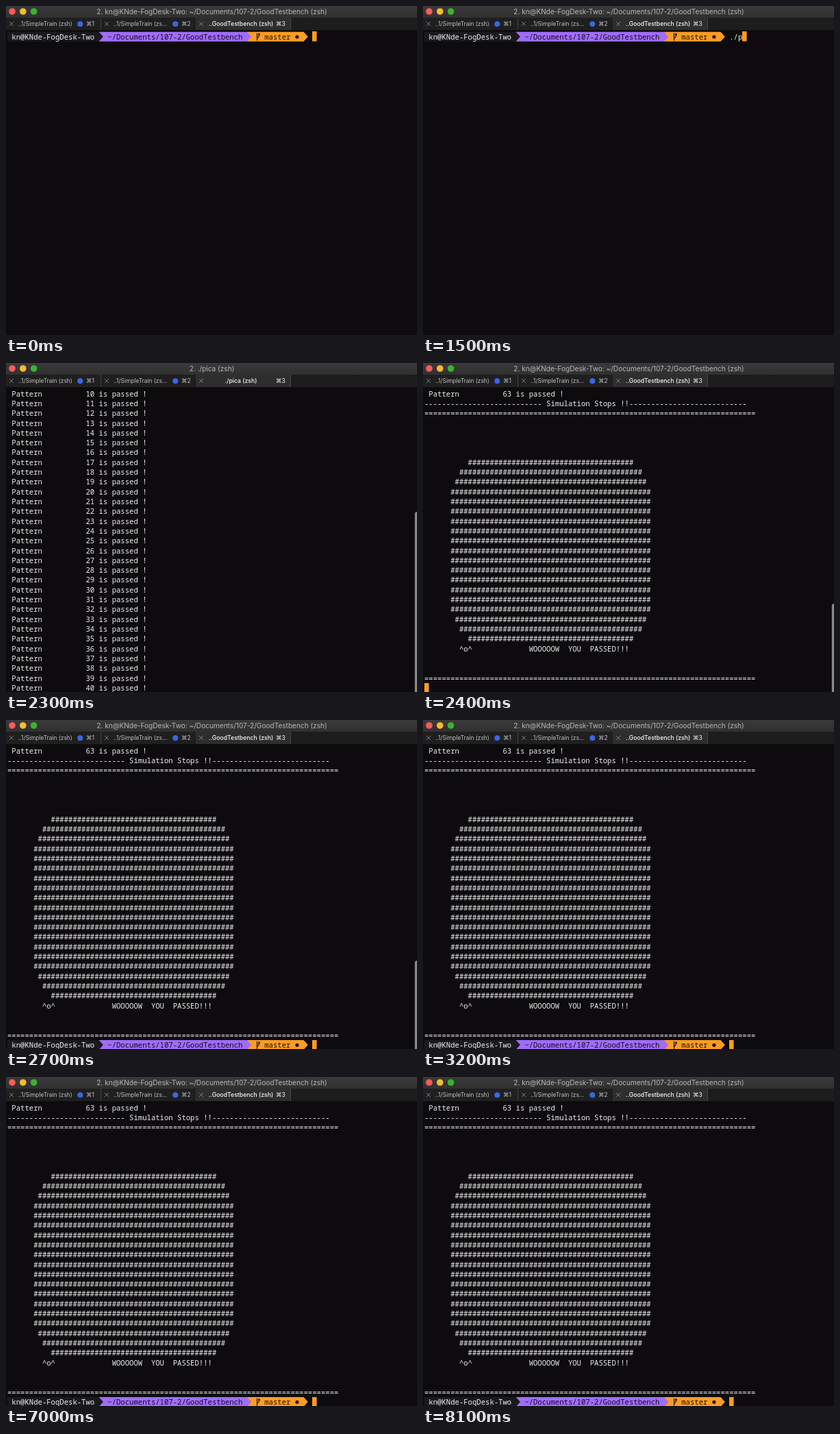
These frames come from a looping animation (600 px wide and 480 px high, 8.3 s). An HTML page with a canvas:

```html
<!DOCTYPE html>
<html lang="en">
<head>
<meta charset="utf-8">
<title>Terminal</title>
<style>
html, body { margin: 0; width: 100%; height: 100%; overflow: hidden; background: #0d0b0e; }
canvas { display: block; }
</style>
</head>
<body>
<canvas id="stage" width="600" height="480"></canvas>
<script>
const ctx = document.getElementById('stage').getContext('2d');

const LOOP = 8300, STEP = 100;
const CELL = 6.36, LINE = 14.31, LEFT = 2, TOP = 37.4, LAST_ROW = 30;
const MONO = '10.6px "Noto Sans Mono", "DejaVu Sans Mono", monospace';
const UI = 'Inter, "Liberation Sans", "DejaVu Sans", sans-serif';
const BACK = '#0d0b0e', INK = '#efefef', PURPLE = '#a06cfb', ORANGE = '#fc9c22';
const HOST = 'kn@KNde-FogDesk-Two', PATH = '~/Documents/107-2/GoodTestbench';
const COMMAND = './pica';

const colX = col => LEFT + col * CELL;
const rowY = row => TOP + row * LINE;

function rect(x, y, w, h, color) {
  ctx.fillStyle = color;
  ctx.fillRect(x, y, w, h);
}

function dot(x, y, r, color) {
  ctx.fillStyle = color;
  ctx.beginPath();
  ctx.arc(x, y, r, 0, Math.PI * 2);
  ctx.fill();
}

function label(text, x, y, size, color, align = 'left', weight = 400) {
  ctx.font = `${weight} ${size}px ${UI}`;
  ctx.textAlign = align;
  ctx.fillStyle = color;
  ctx.fillText(text, x, y);
}

// Terminal text sits on a fixed character grid.
function print(text, row, col = 0, color = INK) {
  ctx.font = MONO;
  ctx.textAlign = 'left';
  ctx.fillStyle = color;
  [...text].forEach((ch, i) => {
    if (ch !== ' ') ctx.fillText(ch, colX(col + i), rowY(row) + 11.2);
  });
}

function cursor(row, col) {
  rect(Math.round(colX(col)), Math.round(rowY(row)), 6.6, 14.5, ORANGE);
}

function segment(row, from, to, color, tip) {
  const x = colX(from), end = colX(to), y = rowY(row) + 0.4, h = LINE - 0.4;
  ctx.fillStyle = color;
  ctx.beginPath();
  ctx.moveTo(x, y);
  ctx.lineTo(end, y);
  if (tip) ctx.lineTo(end + CELL, y + h / 2);
  ctx.lineTo(end, y + h);
  ctx.lineTo(x, y + h);
  ctx.fill();
}

function branchIcon(x, y) {
  ctx.strokeStyle = '#1c1408';
  ctx.lineWidth = 1.2;
  ctx.beginPath();
  ctx.moveTo(x + 2, y + 2);
  ctx.lineTo(x + 2, y + 13);
  ctx.moveTo(x + 2, y + 9.5);
  ctx.quadraticCurveTo(x + 5, y + 8, x + 5, y + 4);
  ctx.moveTo(x + 3.6, y + 5);
  ctx.lineTo(x + 5, y + 3);
  ctx.lineTo(x + 6.4, y + 5);
  ctx.stroke();
}

function prompt(row) {
  segment(row, 55, 68, ORANGE, true);
  segment(row, 21, 55, PURPLE, true);
  segment(row, 0, 21, '#1a191b', true);
  print(HOST, row, 1);
  print(PATH, row, 23, '#130b20');
  branchIcon(colX(57), rowY(row));
  print('master', row, 59, '#1c1408');
  dot(colX(66.5), rowY(row) + 7.6, 2.6, '#1c1408');
}

function tab(x, text, key, active) {
  const ink = active ? '#f8f8f8' : '#c2c2c2';
  rect(x, 17, 139, 18, active ? '#2f2e2f' : '#201f20');
  rect(x + 138, 17, 1, 18, '#454545');
  ctx.strokeStyle = '#858585';
  ctx.lineWidth = 0.9;
  ctx.beginPath();
  ctx.moveTo(x + 5, 23);
  ctx.lineTo(x + 11, 29);
  ctx.moveTo(x + 11, 23);
  ctx.lineTo(x + 5, 29);
  ctx.stroke();
  if (active) {
    label(text, x + 66, 29.4, 8.7, ink, 'center', 500);
  } else {
    label(text, x + 18, 29.4, 8.4, ink);
    dot(x + 108.3, 26.2, 4, '#3768e4');
  }
  label('⌘' + key, x + 117, 29.4, 8.5, ink);
}

function chrome(running) {
  const shade = ctx.createLinearGradient(0, 0, 0, 17);
  shade.addColorStop(0, '#3b3a3b');
  shade.addColorStop(1, '#313031');
  rect(0, 0, 600, 17, shade);
  dot(9, 8, 4.8, '#fc5b54');
  dot(24.8, 8, 4.8, '#f8bb30');
  dot(40.6, 8, 4.8, '#39b52c');
  const title = running ? COMMAND : `${HOST}: ${PATH}`;
  label(`2. ${title} (zsh)`, 300.5, 12, 10.1, '#b9b8b9', 'center');

  rect(0, 17, 600, 19, '#1e1d1e');
  tab(0, '..1/SimpleTrain (zsh)', 1, false);
  tab(139, '..1/SimpleTrain (zs...', 2, false);
  tab(277, running ? './pica (zsh)' : '..GoodTestbench (zsh)', 3, true);
  rect(0, 35, 600, 1, '#101010');
}

function pattern(n, row) {
  print(` Pattern          ${n} is passed !`, row);
}

// A plain rounded block of hash marks.
function block() {
  const mid = 29;
  for (let row = 7; row <= 25; row++) {
    const v = (row - 16) / 9.6;
    const half = Math.round(23 * (1 - v ** 6) ** (1 / 6));
    print('#'.repeat(half * 2), row, mid - half);
  }
}

function results() {
  const dashes = '-'.repeat(27), rule = '='.repeat(76);
  pattern(63, 0);
  print(`${dashes} Simulation Stops !!${dashes}`, 1);
  print(rule, 2);
  block();
  print('^o^', 26, 8);
  print('WOOOOOW  YOU  PASSED!!!', 26, 24);
  print(rule, 29);
}

function scrollbar(y, alpha) {
  ctx.globalAlpha = alpha;
  ctx.fillStyle = '#8b8a8b';
  ctx.beginPath();
  ctx.roundRect(596.8, y, 7, 490 - y, 3.5);
  ctx.fill();
  ctx.globalAlpha = 1;
}

function typing(t) {
  const count = Math.max(0, Math.min(COMMAND.length, Math.floor((t - 1200) / STEP)));
  prompt(0);
  print(COMMAND.slice(0, count), 0, 70);
  if (t >= 1900) cursor(1, 0);
  else if (t < 800 || t >= 1200) cursor(0, 70 + count);
}

function draw(t) {
  rect(0, 0, 600, 480, BACK);
  if (t < 2300) {
    typing(t);
  } else if (t < 2400) {
    for (let row = 0; row <= LAST_ROW; row++) pattern(10 + row, row);
    scrollbar(217, 1);
  } else {
    results();
    if (t < 2500) {
      cursor(LAST_ROW, 0);
    } else {
      prompt(LAST_ROW);
      cursor(LAST_ROW, 70);
    }
    const alpha = Math.min(1, (3200 - t) / 400);
    if (alpha > 0) scrollbar(351, alpha);
  }
  chrome(t >= 1900 && t < 2400);
}

const start = performance.now();
let shown = -1;

function tick() {
  const t = Math.max(0, performance.now() - start) % LOOP;
  const step = Math.floor(t / STEP) * STEP;
  if (step !== shown) {
    shown = step;
    draw(step);
  }
  requestAnimationFrame(tick);
}
tick();
</script>
</body>
</html>
```
